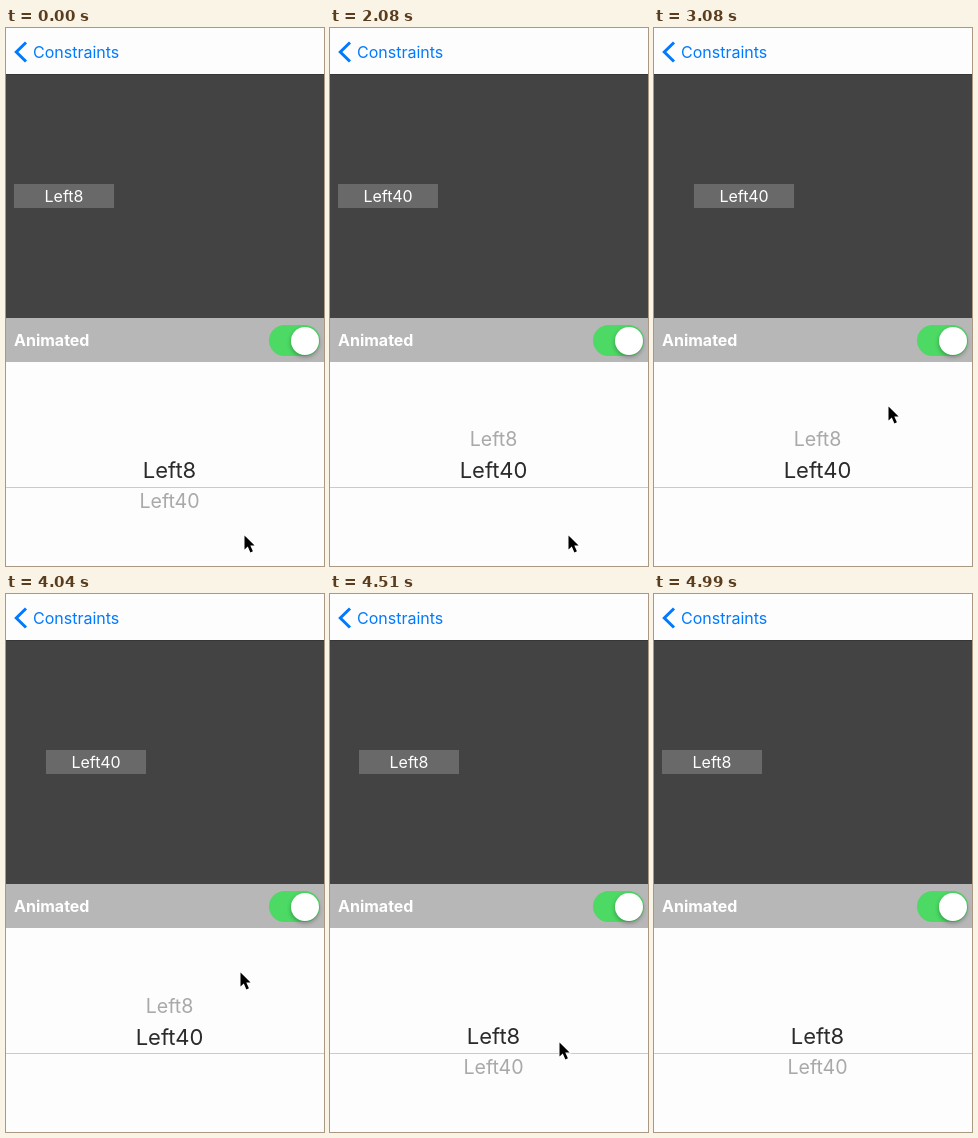
An HTML page that plays this animation: 318 px wide and 538 px high, repeating every 5.47 s.

```html
<!DOCTYPE html>
<html lang="en">
<head>
<meta charset="utf-8">
<title>Constraints</title>
<style>
  html, body { margin: 0; width: 100%; height: 100%; overflow: hidden; }
  body { background: #fdfdfd; }
  #stage {
    position: relative; width: 318px; height: 538px; overflow: hidden;
    background: #fdfdfd; font: 16px Inter, sans-serif;
  }
  #stage div, #stage svg { position: absolute; }
  .nav { left: 27px; top: 12px; line-height: 24px; color: #007aff; }
  .view { top: 46px; width: 318px; height: 244px; background: #434343; box-shadow: inset 0 1px #363636; }
  #box {
    left: 0; top: 156px; width: 100px; height: 24px;
    background: #696969; color: #fff; line-height: 24px; text-align: center;
  }
  .bar {
    top: 290px; width: 318px; height: 44px; background: #b7b7b7;
    color: #fff; font-weight: 700; line-height: 44px; text-indent: 8px;
  }
  .switch { left: 263px; top: 7px; width: 51px; height: 31px; border-radius: 16px; background: #4cd964; }
  .knob {
    left: 21.5px; top: 1.5px; width: 28px; height: 28px; border-radius: 50%;
    background: #fff; box-shadow: 0 2px 4px rgba(0, 0, 0, .3);
  }
  .row { left: 4px; width: 319px; height: 34px; line-height: 34px; text-align: center; }
  .dim { color: #a9a9a9; font-size: 19.6px; }
  .band { top: 425px; width: 318px; height: 34px; overflow: hidden; background: #fdfdfd; }
  .band .row { color: #2b2b2b; font-size: 22px; }
  .line { top: 459px; width: 318px; height: 1px; background: #cbcbcb; }
</style>
</head>
<body>
<div id="stage">
  <svg width="24" height="46" fill="none" stroke="#007aff" stroke-width="3"><path d="M20 14.5 10.3 24 20 33.5"/></svg>
  <div class="nav">Constraints</div>
  <div class="view"></div>
  <div id="box"></div>
  <div class="bar">Animated<div class="switch"><div class="knob"></div></div></div>
  <div class="row dim">Left8</div>
  <div class="row dim">Left40</div>
  <div class="band"><div class="row lit">Left8</div><div class="row lit">Left40</div></div>
  <div class="line"></div>
  <svg id="cursor" width="18" height="24" viewBox="-3 -3 18 24">
    <path d="M.5.5V14.5L3.8 11.5 6.4 17.4 8.9 16.3 6.3 10.6H10.6Z"
      fill="#000" stroke="#fff" stroke-width="1.6" paint-order="stroke"/>
  </svg>
</div>
<script>
  const LOOP = 5470;
  // The screen refreshes in bursts: [first, last, number of refreshes]
  const bursts = [[1800, 2310, 10], [2370, 2540, 4], [2720, 3080, 6], [4040, 4570, 10], [4630, 4990, 7]];
  const path = [
    [0, 238, 507], [2665, 238, 507], [2790, 236.5, 468], [2950, 234.5, 398], [3080, 234, 378],
    [4270, 234, 378], [4390, 232, 400], [4510, 229, 447], [4570, 230, 475],
    [4690, 235, 505], [4810, 241, 521], [4990, 247, 541]
  ];

  const box = document.getElementById('box');
  const cursor = document.getElementById('cursor');
  const dim = document.querySelectorAll('.dim');
  const lit = document.querySelectorAll('.lit');

  const ramp = (t, a, b) => Math.min(1, Math.max(0, (t - a) / (b - a)));

  // cubic-bezier(.42, 0, .58, 1)
  function ease(x) {
    let lo = 0, hi = 1, u = x;
    for (let i = 0; i < 24; i++) {
      u = (lo + hi) / 2;
      if (3 * u * (1 - u) * (.42 + .16 * u) + u ** 3 < x) lo = u; else hi = u;
    }
    return u * u * (3 - 2 * u);
  }

  const there = (t, a, b, c, d) => ease(ramp(t, a, b)) - ease(ramp(t, c, d));

  function snap(t) {
    let time = 0;
    for (const [a, b, n] of bursts) {
      if (t < a) break;
      const step = (b - a) / (n - 1);
      time = Math.min(b, a + Math.floor((t - a) / step + .05) * step);
    }
    return time;
  }

  function pointer(t) {
    let i = 1;
    while (i < path.length - 1 && path[i][0] < t) i++;
    const [a, x, y] = path[i - 1], [b, x2, y2] = path[i];
    const k = ramp(t, a, b);
    return [x + (x2 - x) * k, y + (y2 - y) * k];
  }

  const move = (el, x, y) => { el.style.transform = `translate(${x}px, ${y}px)`; };

  function draw(now) {
    const t = snap(now % LOOP);
    const scroll = there(t, 1755, 2045, 4005, 4310);
    const slide = there(t, 2045, 2495, 4326, 4776);
    dim.forEach((el, i) => move(el, 0, 425 + (i - scroll) * 31));
    lit.forEach((el, i) => move(el, 0, (i - scroll) * 34));
    box.textContent = t > 2045 && t < 4326 ? 'Left40' : 'Left8';
    move(box, Math.round(8 + 32 * slide), 0);
    const [x, y] = pointer(t);
    move(cursor, Math.round(x) - 3, Math.round(y) - 3);
  }

  let start;
  function tick() {
    const now = performance.now();
    start ??= now;
    draw(now - start);
    requestAnimationFrame(tick);
  }
  tick();
</script>
</body>
</html>
```
